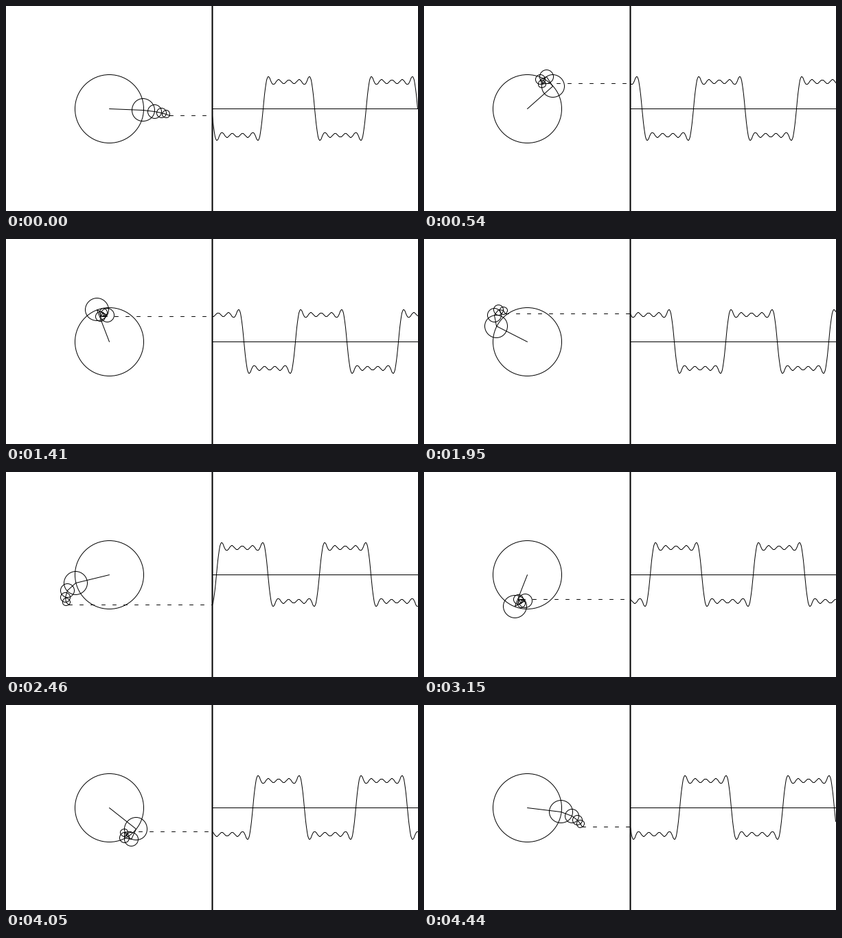
A matplotlib script that plays this animation: 600x300 px, repeating every 4470 ms.

```python
import numpy as np
import matplotlib.pyplot as plt
from matplotlib.animation import FuncAnimation
from matplotlib.patches import PathPatch
from matplotlib.path import Path

WIDTH, HEIGHT, DPI = 600, 300, 100
FRAMES, INTERVAL = 149, 30
CX = CY = 150
AXIS_X = 300
HARMONICS = np.array([1, 3, 5, 7, 9])
RADII = 50 / HARMONICS
STEP = 2 * np.pi / 150
DASH, PERIOD = 5, 16
PX = 72 / DPI
KAPPA = 0.5522847498

plt.rcParams["path.simplify"] = False


def snap(v):
    """Move coordinates to the centre of their pixel."""
    return np.floor(np.asarray(v, float) + 1e-6) + 0.5


def height(theta):
    return (RADII * np.sin(np.multiply.outer(theta, HARMONICS))).sum(-1)


def joints(theta):
    angles = HARMONICS * theta
    x = CX + np.r_[0, np.cumsum(RADII * np.cos(angles))]
    y = CY - np.r_[0, np.cumsum(RADII * np.sin(angles))]
    return x, y


def circle_path(x, y, r):
    """Circle from four curves whose end points sit on pixel centres."""
    dirs = np.array([[1, 0], [0, 1], [-1, 0], [0, -1], [1, 0]])
    ends = snap(np.array([x, y]) + r * dirs)
    verts = [ends[0]]
    for i in range(4):
        verts += [ends[i] + KAPPA * r * dirs[i + 1],
                  ends[i + 1] + KAPPA * r * dirs[i],
                  ends[i + 1]]
    return Path(verts, [Path.MOVETO] + [Path.CURVE4] * 12)


def dash_points(x, y):
    starts = np.arange(x, AXIS_X, PERIOD)
    stops = np.minimum(starts + DASH, AXIS_X)
    gaps = np.full(len(starts), np.nan)
    xs = np.column_stack([snap(starts), snap(stops), gaps]).ravel()
    return xs, np.full(len(xs), snap(y))


fig = plt.figure(figsize=(WIDTH / DPI, HEIGHT / DPI), dpi=DPI, facecolor="white")
ax = fig.add_axes([0, 0, 1, 1])
ax.set_xlim(0, WIDTH)
ax.set_ylim(HEIGHT, 0)
ax.axis("off")


def stroke(xs=(), ys=(), width=1):
    line, = ax.plot(xs, ys, color="black", lw=width * PX, snap=False,
                    solid_capstyle="round", solid_joinstyle="round")
    return line


stroke([300.5, 300.5], [-2, HEIGHT + 2], width=2)
stroke([300.5, WIDTH + 2], [150.5, 150.5])
wave, arms, dashes = stroke(), stroke(), stroke()

circles = []
for radius in RADII:
    ring = PathPatch(circle_path(CX, CY, radius), fill=False, ec="black",
                     lw=PX, snap=False)
    circles.append(ax.add_patch(ring))

offsets = np.arange(WIDTH - AXIS_X)


def draw(n):
    theta = (n - 1) * STEP
    wave.set_data(snap(AXIS_X + offsets), snap(CY - height(theta - offsets * STEP)))
    x, y = joints(theta)
    arms.set_data(snap(x), snap(y))
    dashes.set_data(*dash_points(x[-1], y[-1]))
    for ring, cx, cy, r in zip(circles, x, y, RADII):
        ring.set_path(circle_path(cx, cy, r))
    return [wave, arms, dashes, *circles]


anim = FuncAnimation(fig, draw, frames=FRAMES, interval=INTERVAL,
                     repeat=True, repeat_delay=0)
plt.show()
```
